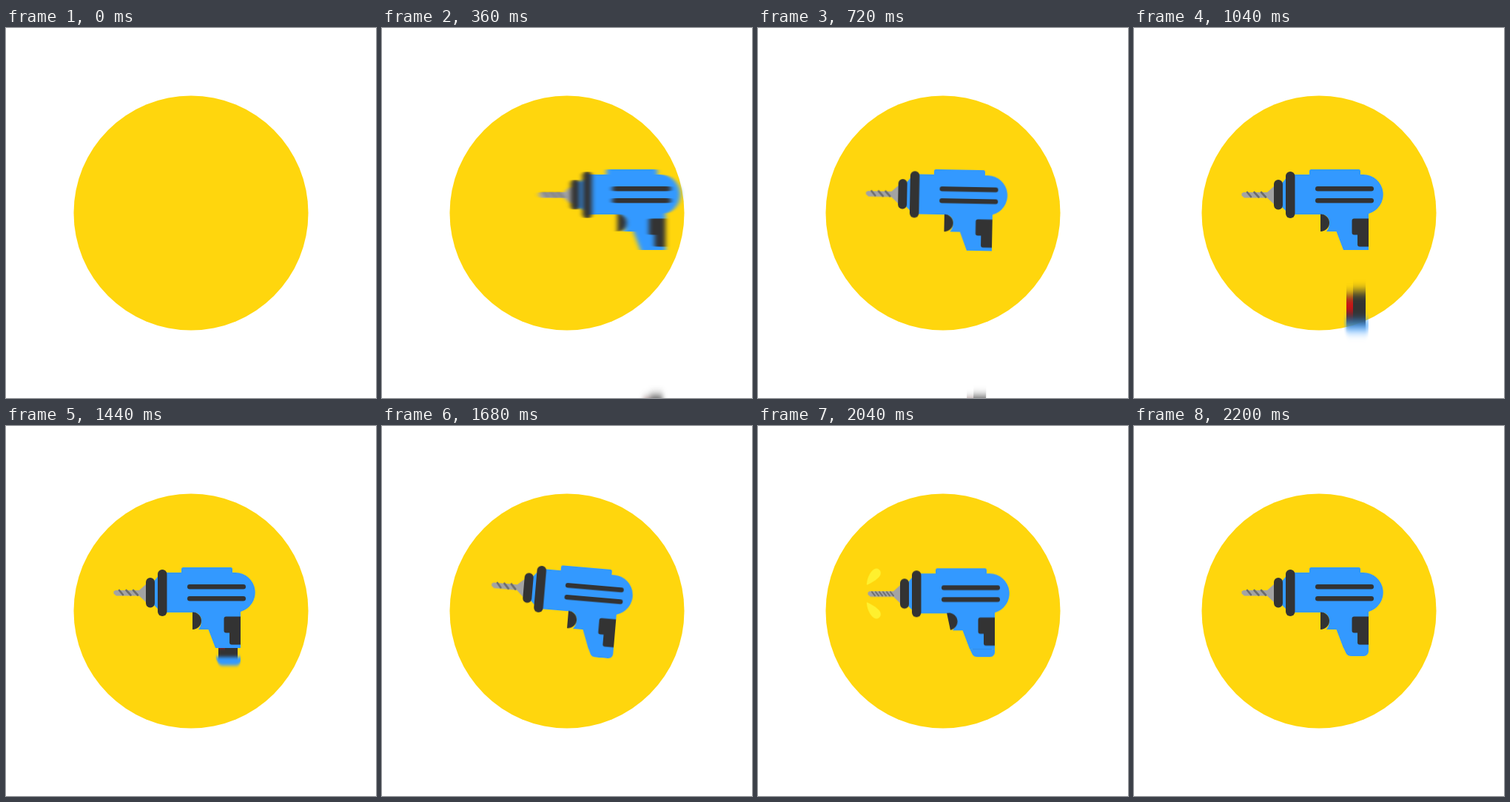
Animation of 500 by 500 pixels, one loop 2560 ms. Source, as an HTML page without scripts:

```html
<!DOCTYPE html>
<html lang="en">
<head>
<meta charset="utf-8">
<title>Cordless drill</title>
<style>
html, body { margin: 0; width: 100%; height: 100%; overflow: hidden; background: #fff; }
svg { display: block; width: 100vw; height: 100vh; }
.blue { fill: #39f; }
.dark { fill: #333; }
.grey { fill: #a3a3a3; }
.flute { stroke: #6c6c6c; stroke-width: 2.6; stroke-linecap: round; }
.spark { fill: #fff02e; }

.show, .slide, .tilt, .rush, .kick, .shake, .lift, .haste, .trigger, .spark, .idle, .spin, .soft {
  animation: 2560ms linear infinite;
}
.show { animation-name: show; animation-timing-function: step-end; }
.slide { animation-name: slide; }
.rush { animation-name: rush; animation-timing-function: step-end; }
.tilt { animation-name: tilt; transform-origin: 242px 245.5px; animation-timing-function: ease-in-out; }
.kick { animation-name: kick; transform-origin: 272px 251px; animation-timing-function: ease-in-out; }
.shake { animation-name: shake; animation-timing-function: step-end; }
.soft { animation-name: soft; animation-timing-function: step-end; }
.lift { animation-name: lift; }
.haste { animation-name: haste; animation-timing-function: step-end; }
.trigger { animation-name: press; transform-origin: 252px 251px; }
.idle { animation-name: idle; animation-timing-function: step-end; }
.spin { animation-name: spin; animation-timing-function: step-end; }
.up { animation-name: flyUp; transform-origin: 147px 215px; }
.down { animation-name: flyDown; transform-origin: 147px 238px; }

@keyframes show { 0% { visibility: hidden } 9.375%, 100% { visibility: visible } }

/* entrance */
@keyframes slide {
  0%, 9.375% { transform: translateX(325px); animation-timing-function: cubic-bezier(.25, .5, .4, 1) }
  19.53%, 100% { transform: none }
}
@keyframes rush {
  0% { filter: url(#h8) }
  14% { filter: url(#h3) }
  17.1%, 100% { filter: none }
}
@keyframes tilt {
  0%, 14% { transform: rotate(0deg) }
  20.3125% { transform: rotate(-15deg) }
  25% { transform: rotate(5deg) }
  29.6875%, 100% { transform: rotate(0deg) }
}

/* battery */
@keyframes lift {
  0%, 32.8125% { transform: translateY(240px); animation-timing-function: cubic-bezier(.4, .3, .7, .7) }
  40.625% { transform: translateY(98px); animation-timing-function: cubic-bezier(.2, .6, .4, 1) }
  50%, 53.125% { transform: translateY(51px); animation-timing-function: cubic-bezier(.3, .2, .6, .8) }
  56.25% { transform: translateY(13px); animation-timing-function: ease-out }
  58.6%, 100% { transform: none }
}
@keyframes haste {
  0% { filter: url(#v7) }
  43.75% { filter: url(#v2) }
  48.4375% { filter: none }
  53.125% { filter: url(#v2) }
  57.8125%, 100% { filter: none }
}

/* recoil, then drilling */
@keyframes kick {
  0%, 57.8125% { transform: none }
  65.625% { transform: rotate(4.9deg) }
  69.53% { transform: translateX(23px) rotate(2deg) }
  72.65% { transform: translateX(-4px) rotate(0deg) }
  74.2%, 100% { transform: none }
}
@keyframes shake {
  0% { transform: none }
  75% { transform: translate(-2px, 2px) }
  76.5625% { transform: translate(3px, 1px) }
  78.125% { transform: translate(-2px, 3px) }
  79.6875% { transform: translate(3px, 1.3px) }
  81.25% { transform: translate(-2px, 2px) }
  82.8125% { transform: translate(3px, 3px) }
  84.375% { transform: translate(-1px, 1px) }
  85.9375%, 100% { transform: none }
}
@keyframes soft {
  0% { filter: none }
  75% { filter: url(#s) }
  85.9375%, 100% { filter: none }
}
@keyframes press {
  0%, 73.4375% { transform: none }
  76.5625%, 83% { transform: rotate(-12deg) }
  85.9375%, 100% { transform: none }
}
@keyframes idle { 0% { opacity: 1 } 75% { opacity: 0 } 85.9375%, 100% { opacity: 1 } }
@keyframes spin { 0% { opacity: 0 } 75% { opacity: 1 } 85.9375%, 100% { opacity: 0 } }
@keyframes flyUp {
  0%, 75% { transform: translate(3px, 8px) scale(0) }
  79.6875% { transform: none }
  84.375%, 100% { transform: translate(10px, -12px) scale(0) }
}
@keyframes flyDown {
  0%, 75% { transform: translate(3px, -8px) scale(0) }
  79.6875% { transform: none }
  84.375%, 100% { transform: translate(10px, 12px) scale(0) }
}
</style>
</head>
<body>
<svg viewBox="0 0 500 500">
  <defs>
    <g color-interpolation-filters="sRGB">
      <filter id="h8" filterUnits="userSpaceOnUse" x="-50" y="-50" width="900" height="600"><feGaussianBlur stdDeviation="8 0"/></filter>
      <filter id="h3" filterUnits="userSpaceOnUse" x="-50" y="-50" width="900" height="600"><feGaussianBlur stdDeviation="3 0"/></filter>
      <filter id="v7" filterUnits="userSpaceOnUse" x="200" y="150" width="200" height="500"><feGaussianBlur stdDeviation="0 7"/></filter>
      <filter id="v2" filterUnits="userSpaceOnUse" x="200" y="150" width="200" height="500"><feGaussianBlur stdDeviation=".5 2"/></filter>
      <filter id="s" filterUnits="userSpaceOnUse" x="100" y="150" width="300" height="200"><feGaussianBlur stdDeviation=".6"/></filter>
    </g>
    <path id="drop" d="M0 0C-.5-7 5-22 13-22.500C18-22.500 20.500-17 18-13C14-7 6-3 0 0Z"/>
  </defs>

  <circle cx="250" cy="250" r="158.500" fill="#ffd60d"/>

  <g class="show"><g class="rush"><g class="slide"><g class="tilt"><g class="kick"><g class="soft"><g class="shake">
    <g class="haste"><g class="lift">
      <path class="dark" d="M287 302V263H296V258H313V302Z"/>
      <path fill="#e00f12" d="M287 269H296V287H287Z"/>
      <path class="blue" d="M283 299.500H317V304.500A6.500 6.500 0 0 1 310.500 311H294Q288.500 311 286.500 307Z"/>
    </g></g>

    <!-- bit -->
    <path class="grey" d="M189 214V238L180 229.500H149L145.500 226.500V223.500L148 222H180Z"/>
    <g class="flute">
      <path class="idle" d="M153 222L158 228M162.500 222L168.500 228.500M172 222L178 228.500" fill="none"/>
      <path class="spin" d="M151 223L155 228M156 223L160 228M161 223L165 228M166 223L170 228M171 223L175 228M176 223L180 228" fill="none" stroke-width="2"/>
    </g>

    <!-- body -->
    <path class="blue" d="M198 212L208 200V250L198 240Z"/>
    <path class="blue" d="M214 198H310A27 27 0 0 1 317 251V300H283L273.500 275H260Q264 270 264 263Q264 255 256 252H214Z"/>
    <rect class="blue" x="237" y="191" width="69" height="12" rx="2.500"/>
    <g class="dark">
      <rect x="189" y="205" width="12" height="40.500" rx="6"/>
      <rect x="205" y="194" width="12.500" height="63" rx="6.250"/>
      <rect x="245" y="214" width="79" height="6.500" rx="3.250"/>
      <rect x="245" y="230" width="79" height="6.500" rx="3.250"/>
      <path d="M297.500 257.500H317V295.500H305Q302 295.500 302 292.500V279.500H297.500Q294.500 279.500 294.500 276.500V260.500Q294.500 257.500 297.500 257.500Z"/>
      <path class="trigger" d="M252 251.500A12 11.750 0 0 1 252 275Z"/>
    </g>
  </g></g></g></g></g></g></g>

  <g class="spark up"><use href="#drop" x="147" y="215"/></g>
  <g class="spark down"><use href="#drop" transform="translate(147 238) scale(1 -1)"/></g>
</svg>
</body>
</html>
```
